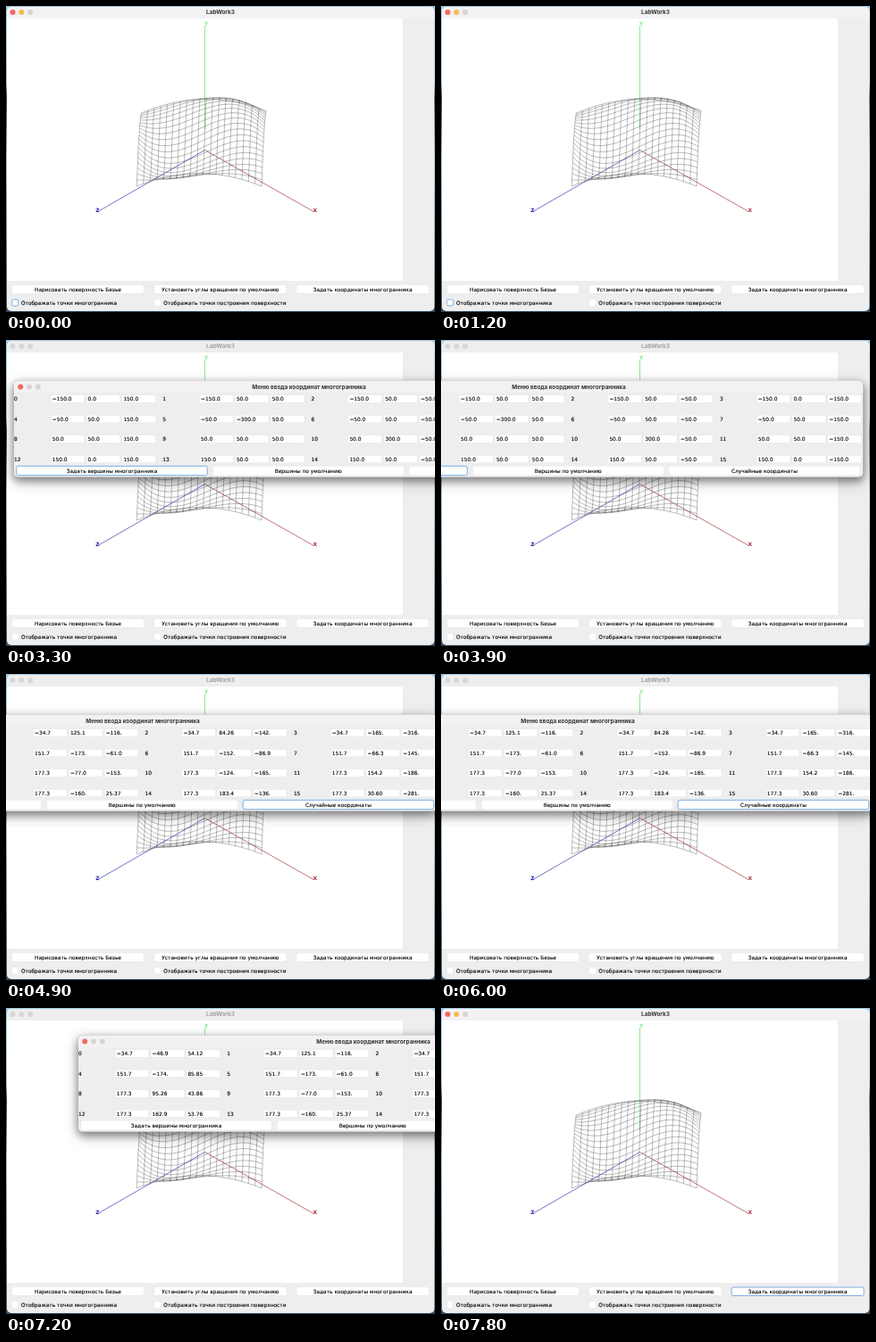
Recreate the animation shown at these times as an HTML page. Size 480x343 px, loop 8000 ms.

```html
<!DOCTYPE html>
<html lang="ru">
<head>
<meta charset="utf-8">
<style>
  html, body { margin: 0; width: 100%; height: 100%; overflow: hidden; background: #ececec; }
  svg { display: block; width: 100vw; height: 100vh; }
  text { font: 5.87px "DejaVu Sans", sans-serif; fill: #000; stroke: #000; stroke-width: .12; dominant-baseline: central; }
  .title { font: 700 6.4px Inter, sans-serif; fill: #333; stroke: none; }
  .middle { text-anchor: middle; }
  .axis { font-weight: bold; stroke: none; }
  .control { fill: #fff; filter: drop-shadow(0 .4px .4px #0003); }
  .field { fill: #fff; stroke: #e2e2e2; stroke-width: .4; }
  .ring { fill: none; stroke: #7eaee2; stroke-width: 1; }
  #mesh { fill: none; stroke: #222; stroke-width: .45; stroke-opacity: .68; }
  #window { filter: drop-shadow(0 4px 4px #0004) drop-shadow(0 4px 8px #0003) drop-shadow(0 0 .5px #0007); }
</style>
</head>
<body>
<svg viewBox="0 0 480 343" preserveAspectRatio="none">
  <defs>
    <linearGradient id="desktop" x2="0" y2="1">
      <stop stop-color="#9dcae4"/><stop offset=".25" stop-color="#9dbccf"/>
      <stop offset=".3" stop-color="#26313a"/><stop offset=".5" stop-color="#9db4c2"/>
      <stop offset="1" stop-color="#34495a"/>
    </linearGradient>
  </defs>
  <rect width="480" height="343" fill="url(#desktop)"/>
  <rect x="1" y="1" width="478.3" height="341" rx="5" fill="#eeeeee"/>
  <path id="bar" d="M1 14V6a5 5 0 0 1 5-5H474.3a5 5 0 0 1 5 5V14Z"/>
  <rect x="1" y="14" width="443" height="294" fill="#fff"/>
  <g id="main"></g>
  <g fill="none" stroke-width=".75">
    <path d="M222.5 22V138" stroke="#62e66e"/>
    <path d="M222.5 161.5L344 230.3" stroke="#a8484c"/>
    <path d="M222.5 161.5L103 230.3" stroke="#4646b4"/>
  </g>
  <path id="mesh"/>
  <text class="axis" x="222" y="19.5" style="fill:#7be887">Y</text>
  <text class="axis" x="343.5" y="229" style="fill:#a8283c">X</text>
  <text class="axis" x="100.3" y="229" style="fill:#2020a8">Z</text>
  <g id="dialog"><g id="window"></g></g>
</svg>
<script>
const LOOP = 8000, OPEN = 1800, RANDOMIZE = 4700, CLOSE = 7500;
const byId = id => document.getElementById(id);
const main = byId('main'), dialog = byId('dialog'), panel = byId('window');

function add(parent, tag, attributes, content = '') {
  const node = document.createElementNS('http://www.w3.org/2000/svg', tag);
  for (const key in attributes) node.setAttribute(key, attributes[key]);
  node.textContent = content;
  return parent.appendChild(node);
}
const label = (parent, x, y, content, cls = '') => add(parent, 'text', { x, y, class: cls }, content);
const box = (parent, x, y, width, height, cls, rx = 2) =>
  add(parent, 'rect', { x, y, width, height, rx, class: cls });
const show = (node, visible) => node.setAttribute('visibility', visible ? 'inherit' : 'hidden');

// Each control returns its focus ring.
function button(parent, x, y, width, height, caption) {
  box(parent, x, y, width, height, 'control');
  label(parent, x + width / 2, y + height / 2, caption, 'middle');
  return box(parent, x, y, width, height, 'ring');
}
function checkbox(x, caption) {
  box(main, x, 329, 7, 7, 'control', 1.5);
  label(main, x + 10.2, 332.5, caption);
  return box(main, x, 329, 7, 7, 'ring', 1.5);
}
const lights = (parent, x, y, colors) => colors.map((fill, i) =>
  add(parent, 'circle', { cx: x + i * 9.8, cy: y, r: 3, fill }));

// Main window
const mainColors = ['#ee6a5f', '#f5bd4f', '#d6d4d6'];
const mainLights = lights(main, 7.5, 7, mainColors);
const mainTitle = label(main, 240, 7, 'LabWork3', 'title middle');
const mainButtons = ['Нарисовать поверхность Безье', 'Установить углы вращения по умолчанию',
  'Задать координаты многогранника'].map((caption, i) => button(main, 6.5 + i * 159.3, 313, 148, 9.5, caption));
const pointsCheck = checkbox(6.7, 'Отображать точки многогранника');
const surfaceCheck = checkbox(166, 'Отображать точки построения поверхности');
[mainButtons[0], mainButtons[1], surfaceCheck].forEach(ring => show(ring, false));

// Bicubic Bezier surface over an evenly spaced control grid
const heights = [[0, 50, 50, 0], [50, -300, 50, 50], [50, 50, 300, 50], [0, 50, 50, 0]];
const bernstein = t => [(1 - t) ** 3, 3 * t * (1 - t) ** 2, 3 * t * t * (1 - t), t ** 3];
const mix = (a, b, t) => a + (b - a) * t;

function project(s, t) {
  const bs = bernstein(s), bt = bernstein(t);
  let height = 0;
  for (let i = 0; i < 4; i++) for (let j = 0; j < 4; j++) height += heights[i][j] * bs[i] * bt[j];
  const x = mix(146.3, 151.3, t) + 139.7 * s;
  const y = mix(202, mix(120, 117.5, s), t) - 0.38 * height;
  return x.toFixed(2) + ' ' + y.toFixed(2);
}
const CELLS = 19, STEPS = 40;
const curve = point => 'M' + Array.from({ length: STEPS + 1 }, (_, i) => point(i / STEPS)).join('L');
let meshPath = '';
for (let i = 0; i <= CELLS; i++) {
  meshPath += curve(t => project(i / CELLS, t)) + curve(s => project(s, i / CELLS));
}
byId('mesh').setAttribute('d', meshPath);

// Coordinate dialog
const randomX = ['-34.7', '151.7', '177.3', '177.3'];
const randomYZ = [
  '-46.9 54.12 125.1 -116. 84.26 -142. -165. -316.',
  '-174. 85.85 -173. -61.0 -152. -86.9 -66.3 -145.',
  '95.26 43.86 -77.0 -153. -124. -165. 154.2 -186.',
  '162.9 53.76 -160. 25.37 183.4 -136. 30.60 -281.'
].map(row => row.split(' '));
const minus = value => value.replace('-', '\u2212');

add(panel, 'rect', { x: 8.7, y: 45.5, width: 659.6, height: 108.2, rx: 5, fill: '#eeeeee' });
add(panel, 'path', { d: 'M8.7 59V50.5a5 5 0 0 1 5-5H663.3a5 5 0 0 1 5 5V59Z', fill: '#f3f1f3' });
lights(dialog, 16.2, 52.5, ['#ee6a5f', '#d6d4d6', '#d6d4d6']);
label(dialog, 339, 52.5, 'Меню ввода координат многогранника', 'title middle');

const fields = [];
for (let row = 0; row < 4; row++) for (let col = 0; col < 4; col++) {
  const left = 9 + col * 166.3, y = 66 + row * 22.5;
  label(dialog, left, y + .3, row * 4 + col);
  const initial = [row * 100 - 150, heights[row][col], 150 - col * 100].map(v => v.toFixed(1));
  const random = [randomX[row], ...randomYZ[row].slice(col * 2, col * 2 + 2)];
  initial.forEach((value, k) => {
    const x = left + 42.8 + k * 39.8;
    box(dialog, x - 1.5, y - 4.2, 37.5, 8.4, 'field', 0);
    fields.push({ node: label(dialog, x, y, ''), values: [minus(value), minus(random[k])] });
  });
}
const dialogRings = ['Задать вершины многогранника', 'Вершины по умолчанию', 'Случайные координаты']
  .map((caption, i) => button(dialog, 11.7 + i * 219.7, 141.3, 213.6, 10.4, caption));

// Window drags: time, x offset, y offset
const track = [[0, 0, 0], [3450, 0, 0], [3900, -196, 0], [4000, -186, 0],
  [6030, -186, 0], [6400, 72, -15], [LOOP, 72, -15]];

function offset(time) {
  const i = track.findIndex(key => key[0] > time);
  const [t0, x0, y0] = track[i - 1], [t1, x1, y1] = track[i];
  const p = (time - t0) / (t1 - t0), eased = p * p * (3 - 2 * p);
  return [mix(x0, x1, eased), mix(y0, y1, eased)];
}

function render(now) {
  const time = now % LOOP;
  const open = time >= OPEN && time < CLOSE;
  const randomized = time >= RANDOMIZE;

  show(dialog, open);
  dialog.setAttribute('opacity', Math.min(1, .5 + (time - OPEN) / 160));
  dialog.setAttribute('transform', `translate(${offset(time)})`);
  fields.forEach(field => {
    const value = field.values[+randomized];
    if (field.node.textContent !== value) field.node.textContent = value;
  });
  dialogRings.forEach((ring, i) => show(ring, i === (randomized ? 2 : 0)));

  mainLights.forEach((light, i) => light.setAttribute('fill', open ? '#d8d6d8' : mainColors[i]));
  mainTitle.style.fill = open ? '#a0a0a0' : '#333';
  byId('bar').setAttribute('fill', open ? '#eeeeee' : '#f3f1f4');
  show(pointsCheck, time < OPEN);
  show(mainButtons[2], time >= CLOSE);
  requestAnimationFrame(render);
}
render(0);
</script>
</body>
</html>
```
